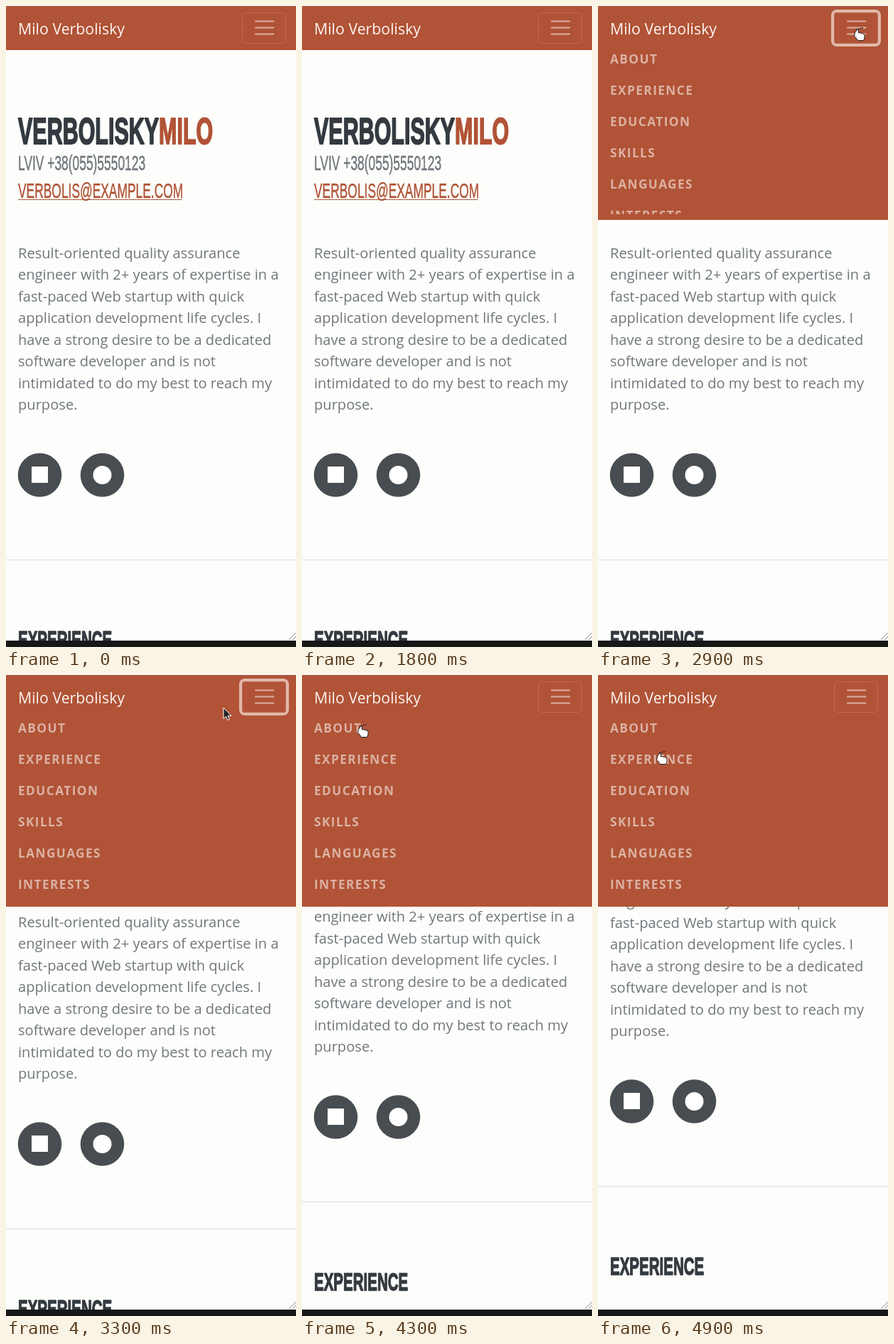
An HTML page that plays this animation: 408 px wide and 902 px high, repeating every 5000 ms.

```html
<!DOCTYPE html>
<html lang="en">
<head>
<meta charset="utf-8">
<title>Resume page</title>
<style>
  html, body { margin: 0; width: 100%; height: 100%; overflow: hidden; background: #fdfefb; }
  svg { display: block; width: 408px; height: 902px; }
  text { font-family: "Open Sans", "Noto Sans", sans-serif; }
  .cond { font-family: "Liberation Sans", Arial, sans-serif; fill: currentColor; stroke: currentColor; stroke-linejoin: round; }
  .title { font-size: 52px; font-weight: 700; stroke-width: 2; color: #343a40; }
  .heading { font-size: 36px; font-weight: 700; stroke-width: 1.5; color: #343a40; }
  .sub { font-size: 29px; stroke-width: .5; color: #70777d; }
  .accent { color: #b15336; }
  .body { font-size: 20.1px; fill: #70777d; }
  .brand { font-size: 21.3px; fill: #fbf5f2; }
  .link { font-size: 17.3px; font-weight: 700; letter-spacing: 1.4px; fill: #dcb1a3; }
</style>
</head>
<body>
<svg viewBox="0 0 408 902">
  <defs>
    <clipPath id="menuClip"><rect id="menuBox" width="408" height="54"/></clipPath>
  </defs>
  <rect width="408" height="902" fill="#fdfefb"/>

  <g id="page">
    <text class="cond title" transform="translate(17 194) scale(.586 1)">VERBOLISKY<tspan class="cond accent">MILO</tspan></text>
    <text class="cond sub" transform="translate(17 230.5) scale(.6 1)">LVIV +38(055)5550123</text>
    <text class="cond sub accent" transform="translate(17 270) scale(.6 1)">VERBOLIS@EXAMPLE.COM</text>
    <path d="M17 272.5H247.500" stroke="#b15336"/>
    <g id="about"></g>
    <circle cx="47.500" cy="660" r="30.800" fill="#484d51"/>
    <rect x="36" y="648" width="23" height="23" fill="#fff"/>
    <circle cx="135.500" cy="660" r="30.800" fill="#484d51"/>
    <circle cx="135.500" cy="660" r="13" fill="#fff"/>
    <path d="M0 779.500H408" stroke="#dcdedd"/>
    <text class="cond heading" transform="translate(17 903.500) scale(.57 1)">EXPERIENCE</text>
  </g>

  <rect id="scrollbar" x="406.500" width="1.500" height="177" fill="#777d80"/>
  <rect id="nav" width="408" height="62" fill="#b15336"/>
  <rect width="408" height="1" fill="#a15650"/>
  <text class="brand" x="17" y="40">Milo Verbolisky</text>
  <rect x="332.500" y="9.500" width="61" height="43" rx="5" fill="none" stroke="#c06d54"/>
  <path d="M351 21.500h25.500m-25.500 9h25.500m-25.500 9h25.500" stroke="#dcb1a3" stroke-width="2" stroke-linecap="round"/>
  <rect id="ring" x="330" y="7" width="66" height="48" rx="6" fill="none" stroke="#e0b8aa" stroke-width="4"/>
  <g id="menu" clip-path="url(#menuClip)"></g>

  <path d="M398 892l10-10M403 892l5-5" stroke="#85888a"/>
  <rect y="893" width="408" height="9" fill="#171717"/>

  <g id="cursor" stroke-linejoin="round">
    <path id="arrow" d="M0 0V15.500L3.600 12.300L6 17.500L8.400 16.400L6.100 11.400H11Z" fill="#222" stroke="#fff"/>
    <path id="hand" d="M-1.500 1Q0-1 1.500 1V6Q4 4.800 5 6.500Q7 5.600 8 7.300Q10 7 10 9V12Q10 14 8.500 16.500H.500Q-1.500 13-4.300 10.300Q-4-.300 8-1.500 10Z" fill="#fff" stroke="#222"/>
  </g>
</svg>
<script>
const LOOP = 5000, STEP = 100;
const $ = id => document.getElementById(id);
const clamp = v => Math.min(1, Math.max(0, v));
const span = (t, start, length) => clamp((t - start) / length);

function addLines(parent, cls, lines, y, gap) {
  lines.forEach((line, i) => {
    const el = document.createElementNS(parent.namespaceURI, 'text');
    el.setAttribute('class', cls);
    el.setAttribute('x', 17);
    el.setAttribute('y', y + i * gap);
    el.textContent = line;
    parent.append(el);
  });
}

addLines($('about'), 'body', [
  'Result-oriented quality assurance',
  'engineer with 2+ years of expertise in a',
  'fast-paced Web startup with quick',
  'application development life cycles. I',
  'have a strong desire to be a dedicated',
  'software developer and is not',
  'intimidated to do my best to reach my',
  'purpose.'
], 355, 30.43);
addLines($('menu'), 'link',
  ['ABOUT', 'EXPERIENCE', 'EDUCATION', 'SKILLS', 'LANGUAGES', 'INTERESTS'], 81, 44);

// The CSS "ease" curve, solved by bisection
function ease(x) {
  const curve = (s, a, b) => 3 * s * (1 - s) * ((1 - s) * a + s * b) + s ** 3;
  let lo = 0, hi = 1;
  for (let i = 0; i < 20; i++) {
    const mid = (lo + hi) / 2;
    if (curve(mid, .25, .25) < x) lo = mid; else hi = mid;
  }
  return curve(lo, .1, 1);
}

// Pointer path: time, x, y
const path = [
  [2300, 412, 70], [2600, 365, 32], [2900, 365, 32], [3300, 306, 46],
  [4000, 83, 71], [4400, 83, 71], [4900, 87, 109]
];

function pointer(t) {
  const i = path.findIndex(p => p[0] > t);
  if (i < 0) return path[path.length - 1].slice(1);
  if (i === 0) return path[0].slice(1);
  const [t0, x0, y0] = path[i - 1], [t1, x1, y1] = path[i];
  const p = span(t, t0, t1 - t0), k = p * p * (3 - 2 * p);
  return [x0 + (x1 - x0) * k, y0 + (y1 - y0) * k];
}

const show = (id, on) => $(id).setAttribute('visibility', on ? 'visible' : 'hidden');

function draw(t) {
  const height = Math.round(62 + 264 * ease(span(t, 2679, 350)));
  $('nav').setAttribute('height', height);
  $('menuBox').setAttribute('height', height - 8);
  $('ring').setAttribute('opacity', span(t, 2700, 150) - span(t, 4100, 150));

  const scroll = Math.round(60 * (1 - (1 - span(t, 4100, 700)) ** 3));
  $('page').setAttribute('transform', `translate(0 ${-scroll})`);
  show('scrollbar', t >= 2300 && t < 3100);

  const [x, y] = pointer(t);
  const visible = t >= 2300;
  const overLink = (x > 332 && x < 394 && y < 53) || (y > 53 && height > 300);
  $('cursor').setAttribute('transform', `translate(${x} ${y})`);
  show('arrow', visible && !overLink);
  show('hand', visible && overLink);
}

function frame() {
  draw(Math.floor(performance.now() % LOOP / STEP) * STEP);
  requestAnimationFrame(frame);
}
frame();
</script>
</body>
</html>
```
